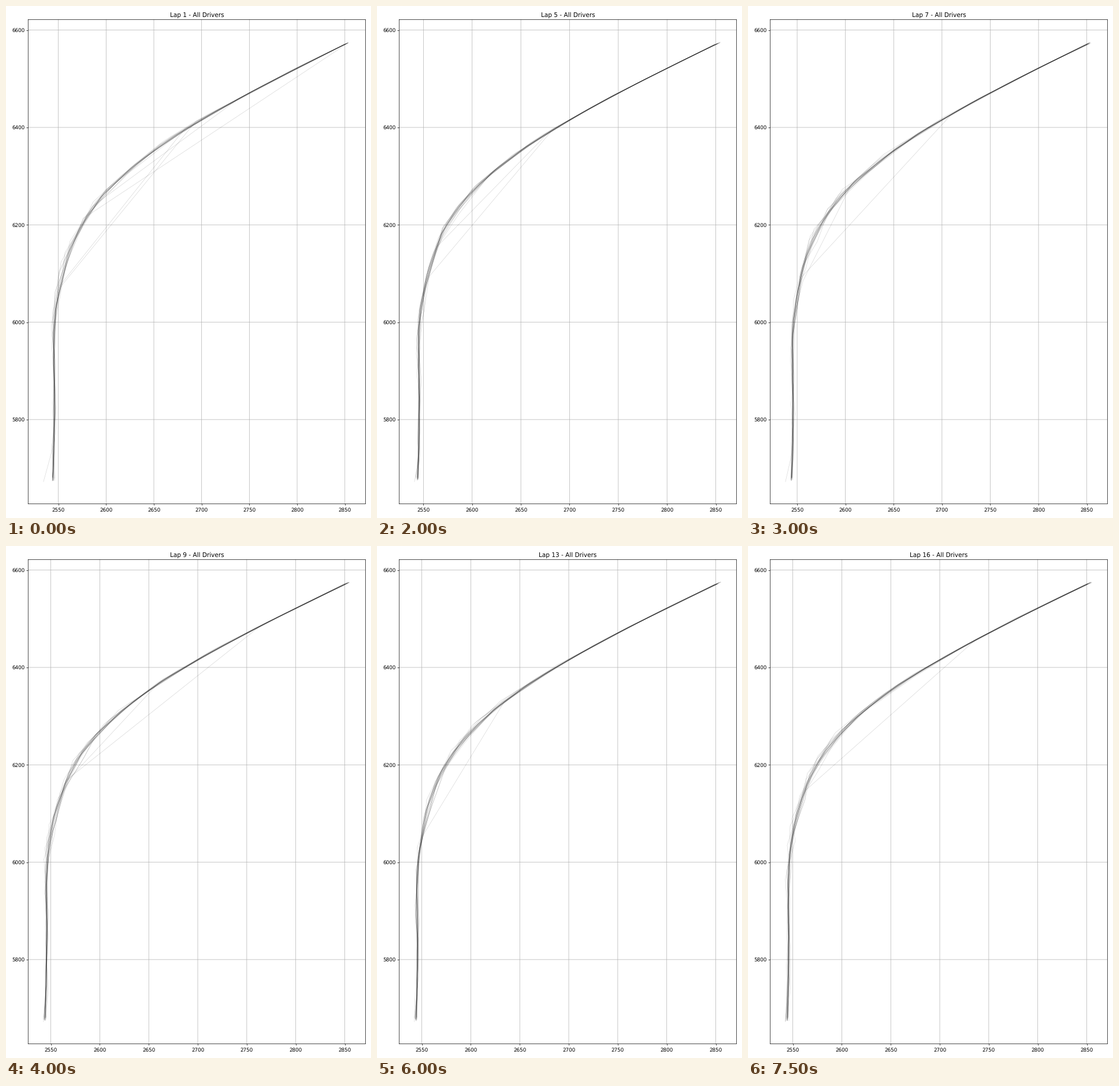
A matplotlib script for the animation above (8000 ms loop, 632 px wide and 885 px high).

```python
import numpy as np
import matplotlib.pyplot as plt
from matplotlib.animation import FuncAnimation
from matplotlib.ticker import MultipleLocator

W, H, DPI = 632, 885, 63.2
LAPS, DRIVERS, STEP = 16, 20, 500
X_MAX, Y_MIN, Y_MAX = 2855.5, 5672.3, 6576.3
MARGIN = 0.05

plt.rcParams.update({"font.family": "DejaVu Sans", "text.hinting": "none"})


def bell(y, center, width):
    return np.exp(-((y - center) / width) ** 2)


def racing_line(y):
    """x on the ideal line: a straight that bends smoothly into a slope."""
    bend = 98 * np.logaddexp(0, (y - 6295) / 90)
    entry = 1.5 * np.exp(-(y - 5672) / 45)
    return 2545.4 + bend - entry - 2.8 * bell(y, 5995, 95)


def x_min(lap):
    """Leftmost sample: the first laps stray further out."""
    return np.interp(lap, [1, 5, 7, 9], [2534.4, 2540.8, 2537.9, 2542.5])


def driver_path(rng):
    start, end = rng.uniform(5673.5, 5682), rng.uniform(6570, 6575.5)
    ys = start + np.cumsum(rng.uniform(35, 85, 30))
    ys = np.r_[start, ys[ys < end - 15], end]
    corner = bell(ys, 6200, 190)
    # Heavy tails give the odd sample well off the line
    error = np.clip(rng.standard_t(3, ys.size), -4, 4)
    xs = racing_line(ys) - 0.8 * corner + (0.5 + 0.9 * corner) * error
    return np.c_[xs, ys]


def cut(path, low, high):
    """Drop the samples between two heights, leaving a straight chord."""
    y = path[:, 1]
    return path[(y < low) | (y > high)]


def lap_paths(lap):
    rng = np.random.default_rng(100 + lap)
    paths = [driver_path(rng) for _ in range(DRIVERS)]
    paths[0][0] = x_min(lap), Y_MIN
    for k in range(1, 2 + 12 // (lap + 3)):
        low = rng.uniform(6050, 6280)
        paths[k] = cut(paths[k], low, low + rng.uniform(130, 300))
    return paths


fig = plt.figure(figsize=(W / DPI, (H + 0.01) / DPI), dpi=DPI, facecolor="white")
left, right, top, bottom = 38.3, 622.4, 23.5, 860.4
ax = fig.add_axes([left / W, 1 - bottom / H, (right - left) / W, (bottom - top) / H])
ax.xaxis.set_major_locator(MultipleLocator(50))
ax.yaxis.set_major_locator(MultipleLocator(200))
ax.grid(True, snap=False)
for spine in ax.spines.values():
    spine.set_snap(False)
title = ax.set_title("")
lines = [ax.plot([], [], color="black", lw=0.6, alpha=0.2)[0] for _ in range(DRIVERS)]


def update(i):
    lap = i + 1
    x0 = x_min(lap)
    mx, my = MARGIN * (X_MAX - x0), MARGIN * (Y_MAX - Y_MIN)
    ax.set_xlim(x0 - mx, X_MAX + mx)
    ax.set_ylim(Y_MIN - my, Y_MAX + my)
    title.set_text(f"Lap {lap} - All Drivers")
    for line, path in zip(lines, lap_paths(lap)):
        line.set_data(path[:, 0], path[:, 1])
    return lines


anim = FuncAnimation(fig, update, frames=LAPS, interval=STEP, repeat=True, repeat_delay=0)
plt.show()
```
